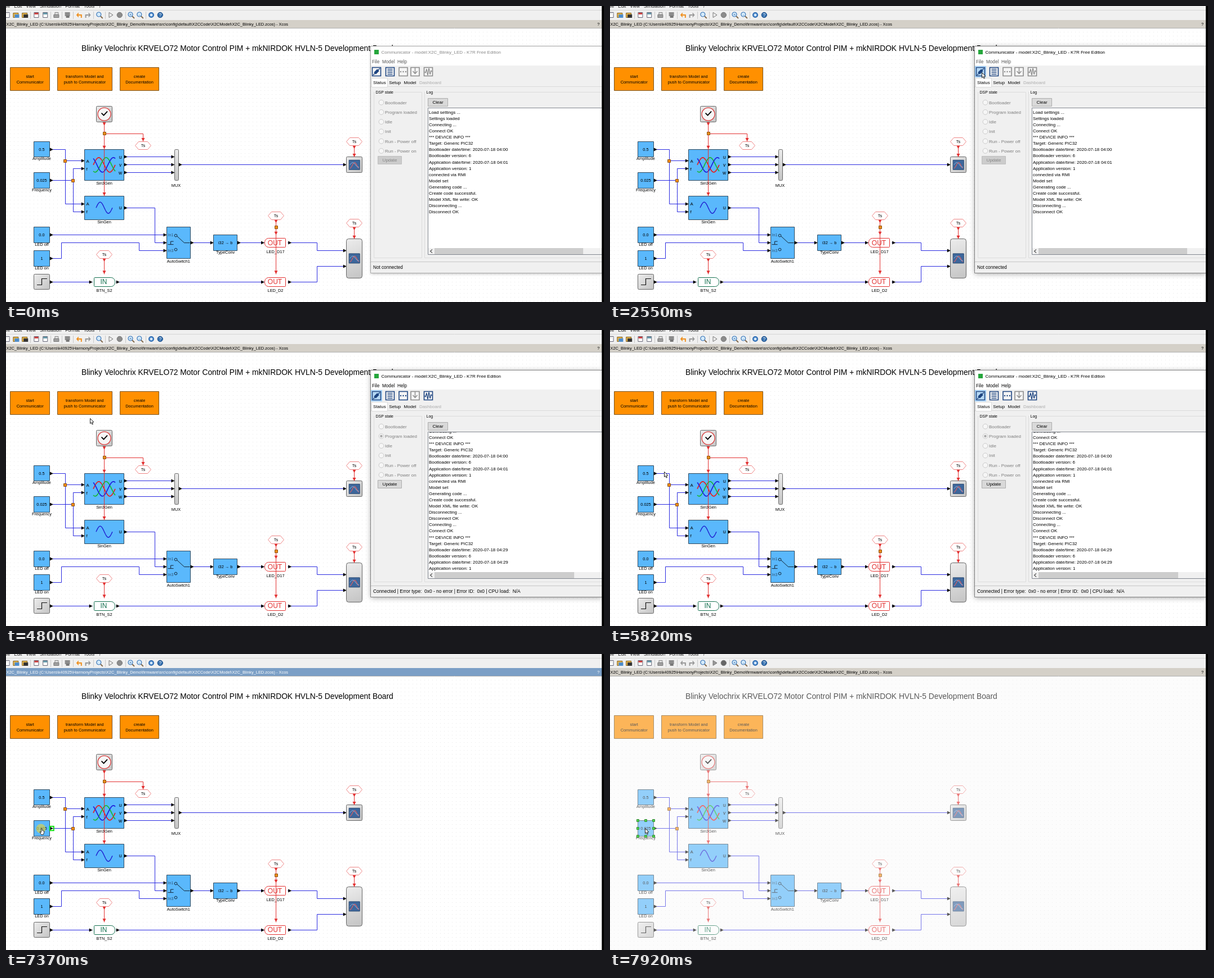
Write an HTML page with a canvas that moves like this. It is 1062 px wide and 527 px high and loops after 7.99 s.

```html
<!DOCTYPE html>
<html lang="en">
<head>
<meta charset="utf-8">
<title>Block diagram and communicator</title>
<style>
html, body { margin: 0; width: 100%; height: 100%; overflow: hidden; background: #fff; }
canvas { display: block; }
</style>
</head>
<body>
<canvas id="stage" width="1062" height="527"></canvas>
<script>
const W = 1062, H = 527, LOOP = 7990, EDGE = 1058;
const ACTIVATE = 2550, CONNECT = 3100, LOADED = 3250, RAISE = 7370, SELECT = 7520, DIM = 7840;
const FONT = '"Liberation Sans", Arial, sans-serif';
const BLUE = '#5ab8fc', WIRE = '#2b2be0', RED = '#e23030', NAVY = '#1d4480', GREY = '#8c8c8c';
const stage = document.getElementById('stage').getContext('2d');
let c = stage;

// ---- drawing helpers ----
const snap = v => Math.floor(v) + 0.5;

function text(s, x, y, size = 7.4, color = '#000', align = 'center') {
  c.font = `${size}px ${FONT}`;
  c.textAlign = align;
  c.fillStyle = color;
  c.fillText(s, x, y + size * 0.36);
}
const left = (s, x, y, size = 8, color = '#000') => text(s, x, y, size, color, 'left');

function row(words, x, y, gap, size, color) {
  for (const word of words) {
    left(word, x, y, size, color(word));
    x += c.measureText(word).width + gap;
  }
}
function paint(fill, stroke, line = 1) {
  if (fill) { c.fillStyle = fill; c.fill(); }
  if (stroke) { c.strokeStyle = stroke; c.lineWidth = line; c.stroke(); }
}
function fillRect(x, y, w, h, fill) {
  c.fillStyle = fill;
  c.fillRect(x, y, w, h);
}
function box(x, y, w, h, fill, stroke, radii = 0) {
  const l = snap(x), t = snap(y);
  c.beginPath();
  c.roundRect(l, t, snap(x + w) - l, snap(y + h) - t, radii);
  paint(fill, stroke);
}
function disc(x, y, r, fill, stroke, line) {
  c.beginPath();
  c.arc(x, y, r, 0, 2 * Math.PI);
  paint(fill, stroke, line);
}
function trace(pts) {
  c.beginPath();
  for (let i = 0; i < pts.length; i += 2) c.lineTo(pts[i], pts[i + 1]);
}
function line(color, width, ...pts) { trace(pts); paint(null, color, width); }
function shape(fill, stroke, ...pts) { trace(pts); c.closePath(); paint(fill, stroke); }
function hLine(y, color, x = 0, end = W) { line(color, 1, x, snap(y), end, snap(y)); }
function at(x, y, draw) {
  c.save();
  c.translate(x, y);
  draw();
  c.restore();
}
function curve(x, y, w, color, width, f) {
  c.beginPath();
  for (let u = 0; u <= 1; u += 1 / 32) c.lineTo(x + w * u, y + f(u));
  paint(null, color, width);
}

// ---- block diagram, laid out on the editor grid ----
const U = 6.94;
const X = n => 49.6 + n * U, Y = n => 241.2 + n * U;

const right = (x, y) => at(x, snap(y), () => shape('#000', null, 0, -3, 6, 0, 0, 3));
const down = (x, y) => at(snap(x), y, () => shape(RED, null, -3, 0, 3, 0, 0, 6));
const joint = (gx, gy) => box(X(gx) - 2.5, Y(gy) - 2.5, 5, 5, '#f28c18', '#8a5210');
const signal = (color, ...cells) => line(color, 1, ...cells.map((n, i) => snap(i % 2 ? Y(n) : X(n))));

function wire(x0, y0, x1, y1 = y0, bend = x1) {
  signal(WIRE, x0, y0, bend, y0, bend, y1, x1, y1);
  right(X(x1) - 6, Y(y1));
}
function output(gx, gy) { right(X(gx) + 0.5, Y(gy)); }

function block(gx, gy, gw, gh, label, value = '') {
  box(X(gx), Y(gy), gw * U, gh * U, BLUE, '#30495c');
  text(value, X(gx + gw / 2), Y(gy + gh / 2));
  text(label, X(gx + gw / 2), Y(gy + gh) + gh * 0.65);
}
function greyBox(gx, gy, gw = 4, gh = 4) {
  const x = X(gx), y = Y(gy);
  const g = c.createLinearGradient(x, y, x + gw * U, y + gh * U);
  g.addColorStop(0, '#ececec');
  g.addColorStop(1, '#c4c4c4');
  box(x, y, gw * U, gh * U, g, '#666', gh > 8 ? 4 : 2);
}
function scope(gx, gy, gh) {
  greyBox(gx, gy, 4, gh);
  at(X(gx + 2), Y(gy + gh / 2), () => {
    box(-10, -9, 19, 17, '#3d679c', '#294870');
    curve(-8, 1, 16, '#e86060', 1.1, u => 5 * Math.cos(6 * u));
    curve(-8, 0, 16, '#9cc4ec', 1, u => -4 * Math.sin(5 * u));
  });
}
function terminal(gx, gy, name, label, color, radii) {
  const x = X(gx), y = Y(gy);
  box(x - 18.5, y - 8, 37, 16, '#fff', color, radii);
  text(name, x - 1, y, 12, color);
  text(label, x, y + 15.5);
}
function event(gx, gy, end) {
  const x = snap(X(gx)), y = snap(Y(gy));
  if (end) {
    signal(RED, gx, gy, gx, end);
    down(x, y + 7);
    down(x, Y(end) - 6);
  }
  shape('#fff', '#ee8585', x - 14, y, x - 8, y - 7, x + 8, y - 7, x + 14, y, x + 8, y + 7, x - 8, y + 7);
  text('Ts', x, y);
}
function orangeButton(gx, gw, ...lines) {
  box(X(gx), Y(-19), gw * U, 6 * U, '#ff9000', '#7a5420');
  lines.forEach((s, i) => text(s, X(gx + gw / 2), 125.5 + i * 9.6));
}
function drawClock() {
  greyBox(16, -9);
  at(X(18), Y(-7), () => {
    disc(0, 0, 11.5, '#f6f6f6', '#d83838', 1.3);
    line('#000', 1.8, -5, -2, -1, 2, 5.5, -5);
  });
}
function drawSwitch() {
  at(X(34), Y(26), () => {
    left('In1', 2, -14, 7, '#315777');
    left('In3', 2, 14, 7, '#315777');
    line('#123', 1, 2, 3, 7, 3, 7, -2.5, 12, -2.5);
    line('#123', 1, 7, 3, 12, 3);
    for (const y of [-13, 12]) disc(16, y, 2.3, BLUE, '#123');
    line('#123', 1, 18, -12, 31, 0, 41, 0);
  });
}

function drawDiagram() {
  fillRect(0, 39, W, H, '#fff');
  for (let y = Y(-29); y < H; y += U) for (let x = X(-7); x < W; x += U) fillRect(Math.floor(x), Math.floor(y), 1, 1, '#e6e6e6');

  left('Blinky Velochrix KRVELO72 Motor Control PIM + mkNIRDOK HVLN-5 Development Board', 134, 75, 13.8);
  orangeButton(-6, 10, 'start', 'Communicator');
  orangeButton(6, 14, 'transform Model and', 'push to Communicator');
  orangeButton(22, 10, 'create', 'Documentation');

  wire(4, 2, 13, 16, 8);
  wire(8, 5, 13);
  wire(4, 10, 13, 18, 10);
  wire(10, 10, 13, 7, 10);
  for (const y of [4, 6, 8]) { wire(23, y, 36); output(23, y); }
  wire(37, 6, 80);
  wire(23, 17, 34, 26, 31);
  wire(4, 24, 34);
  signal(WIRE, 4, 30, 7, 30, 7, 26, 27, 26);
  wire(27, 26, 34, 28, 27);
  wire(40, 26, 46);
  wire(52, 26, 59);
  wire(65, 26, 80, 28, 72.5);
  wire(65, 36, 80, 32, 72.5);
  wire(4, 36, 15);
  wire(21, 36, 59);

  drawClock();
  block(0, 0, 4, 4, 'Amplitude', '0.5');
  block(0, 8, 4, 4, 'Frequency', '0.025');
  block(0, 22, 4, 4, 'LED off', '0.0');
  block(0, 28, 4, 4, 'LED on', '1');
  block(13, 2, 10, 8, 'Sin3Gen');
  block(13, 14, 10, 6, 'SinGen');
  block(34, 22, 6, 8, 'AutoSwitch1');
  block(46, 24, 6, 4, 'TypeConv', 'i32 → b');
  for (const y of [2, 10, 24, 30, 36]) output(4, y);
  for (const [x, y] of [[23, 17], [40, 26], [52, 26], [65, 26], [65, 36], [21, 36], [37, 6]]) output(x, y);

  ['#e82020', '#18b838', '#2020dc'].forEach((color, i) =>
    curve(155, Y(6), 39, color, 1.7, u => -13 * Math.sin(2 * Math.PI * (u - i / 3))));
  curve(160, Y(17), 29, '#2020d0', 1.4, u => -10 * Math.sin(2 * Math.PI * u));
  for (const top of [5, 16]) ['A', 'f'].forEach((s, i) => left(s, 142.5, Y(top + 2 * i), 7.8));
  ['u', 'v', 'w'].forEach((s, i) => text(s, 203, Y(4 + 2 * i), 8.4));
  text('u', 203, Y(17), 8.4);
  drawSwitch();

  greyBox(36, 2, 1, 8);
  text('MUX', 302, 319);
  scope(80, 4, 4);
  scope(80, 25, 10);
  greyBox(0, 34);
  line('#111', 1.2, 55, 496.5, 63.5, 496.5, 63.5, 485.5, 73, 485.5);

  terminal(18, 36, 'IN', 'BTN_S2', '#14704f', [1, 7, 7, 1]);
  terminal(61.8, 26, 'OUT', 'LED_D17', RED, [7, 1, 1, 7]);
  terminal(61.8, 36, 'OUT', 'LED_D2', RED, [7, 1, 1, 7]);

  signal(RED, 18, -5, 18, 14);
  signal(RED, 18, -2, 28, -2, 28, 0);
  for (const [x, y] of [[18, -4.9], [18, 1.1], [18, 13.1], [28, -0.9]]) down(X(x), Y(y));
  event(28, 1);
  event(82, 0, 4);
  event(82, 21, 25);
  event(18, 29, 34);
  event(62, 19, 34);
  down(X(62), Y(24) - 6);
  joint(18, -2);
  joint(8, 5);
  joint(10, 10);
  joint(62, 22);
}

// ---- main window toolbar and title ----
const page = accent => () => {
  box(-4, -5, 8, 9, '#fff', '#667');
  fillRect(-3, -4, 7, 3, accent);
};
const folder = front => () => {
  box(-5, -4, 9, 8, '#e5b54e', '#806020');
  fillRect(-2, -1, 8, 6, front);
};
const printer = () => {
  box(-3, -5, 6, 5, '#ddd', '#888');
  box(-5, -1, 9, 5, '#a0a0a0', '#777');
};
const bin = () => { fillRect(-5, -5, 9, 7, GREY); fillRect(-3, 1, 6, 4, '#777'); };
const turn = (dir, color) => () => {
  line(color, 2, 4 * dir, 5, 4 * dir, 0, -dir, 0);
  shape(color, null, -5 * dir, 0, -dir, -4.5, -dir, 4.5);
};
const lens = sign => () => {
  line('#80684a', 1.8, 2, 2, 6, 6);
  disc(-1, -1, 4, '#d4eafa', '#3a76b8', 1.2);
  text(sign, -1, -1, 7, '#225ca0');
};
const play = color => () => shape(color, '#777', -3, -4.5, -3, 4.5, 4, 0);
const dot = (fill, ring) => () => disc(0, 0, 4.7, fill, ring);
const gear = () => { disc(0, 0, 4, '#8cb8e4', '#2d6cb4', 2); disc(0, 0, 1.5, '#fff'); };
const help = () => { dot('#336fae', '#204f88')(); text('?', 0, 0, 8.5, '#fff'); };

function drawChrome(active, dimmed) {
  fillRect(0, 0, W, 25, '#f0f0f0');
  row(['File', 'Edit', 'View', 'Simulation', 'Format', 'Tools', '?'], -6, 0, 7, 8.2, () => '#222');
  hLine(7, '#d6d6d6');
  const groups = [
    [page('#eee'), folder('#4c8ccc'), folder('#333')],
    [page('#c44'), page('#69a')],
    [printer],
    [bin],
    [turn(1, dimmed ? '#999' : '#ef9020'), turn(-1, '#999')],
    [lens('')],
    [play(dimmed ? '#999' : '#eee'), dot(dimmed ? '#666' : GREY, '#777')],
    [lens('+'), lens('-')],
    [gear, help]
  ];
  let x = 1.6;
  for (const icons of groups) {
    for (const icon of icons) { at(x, 16, icon); x += 15.8; }
    if (icons !== groups.at(-1)) fillRect(Math.round(x - 6), 10, 1, 13, '#c8c8c8');
    x += 4.4;
  }
  fillRect(0, 25, W, 14, active ? '#7b9fc6' : '#d4d0c8');
  hLine(39, '#b0b0b0');
  const ink = active ? '#fff' : '#000';
  text('X2C_Blinky_LED (C:\\Users\\k40925\\HarmonyProjects\\X2C_Blinky_Demo\\firmware\\src\\config\\default\\X2CCode\\X2CModel\\X2C_Blinky_LED.zcos) - Xcos', 501, 32.5, 7.42, ink, 'right');
  text('?', 1052, 32.5, 7.4, ink);
}

// ---- communicator window ----
const device = (boot, app) => ['Connecting ...', 'Connect OK', '*** DEVICE INFO ***', 'Target: Generic PIC32',
  `Bootloader date/time: 2020-07-18 ${boot}`, 'Bootloader version: 6',
  `Application date/time: 2020-07-18 ${app}`, 'Application version: 1'];
const FIRST_LOG = ['Load settings ...', 'Settings loaded', ...device('04:00', '04:01'), 'connected via RMI', 'Model set',
  'Generating code ...', 'Create code successful.', 'Model XML file write: OK', 'Disconnecting ...', 'Disconnect OK'];
const FULL_LOG = [...FIRST_LOG, ...device('04:29', '04:29')];
const STATES = ['Bootloader', 'Program loaded', 'Idle', 'Init', 'Run - Power off', 'Run - Power on'];

function group(label, x, w) {
  box(x, 153, w, 295, null, '#dcdcdc');
  c.font = `7px ${FONT}`;
  fillRect(x + 2, 150, c.measureText(label).width + 3, 8, '#f0f0f0');
  left(label, x + 3.5, 153.5, 7);
}
function button(label, x, y, w, enabled) {
  box(x, y, w, 14, enabled ? '#d9d9d9' : '#cccccc', enabled ? '#adadad' : '#bfbfbf');
  text(label, x + w / 2 + 0.5, y + 7.5, 8, enabled ? '#000' : '#838383');
}
function tool(x, color, draw, fill = '#f5f5f5') {
  at(x, 117, () => {
    c.beginPath();
    c.rect(-7.5, -7.5, 15, 15);
    paint(fill, color, 1.6);
    draw();
  });
}
function drawTools(hover, online) {
  const live = online ? NAVY : GREY;
  if (hover) box(648, 107, 19, 19, '#cce8ff', '#99d1ff');
  tool(658, NAVY, () => {
    line(NAVY, 1.5, -6, 6, 6, -6);
    line(NAVY, 5, -3, 3, 3, -3);
  }, hover ? '#b5d8f4' : '#f5f5f5');
  tool(682, NAVY, () => { for (let y = -4.5; y < 6; y += 3) line(NAVY, 1.3, -4.5, y, 4.5, y); });
  tool(705.5, live, () => { for (let x = -4.5; x < 6; x += 4.5) disc(x, 0, 1.2, live); });
  tool(726.5, GREY, () => {
    line(GREY, 1.4, 0, -8, 0, 3);
    line(GREY, 1.4, -4, -1, 0, 3.5, 4, -1);
  });
  tool(750, live, () => curve(-6.5, 0, 13, live, 1.3, u => 6 * Math.sin(u * Math.PI) * Math.sin(u * 6 * Math.PI)));
}
function drawFrame(active) {
  c.save();
  c.shadowColor = `rgba(0,0,0,${active ? 0.35 : 0.25})`;
  c.shadowBlur = active ? 9 : 5;
  c.shadowOffsetY = 2;
  fillRect(648, 71, 411, 404, '#f0f0f0');
  c.restore();
  fillRect(648, 71, 411, 35, '#fff');
  box(647, 71, 415, 404, null, active ? '#808080' : '#a8a8a8');
  fillRect(654, 78, 8, 8, '#25a63c');
  left('Communicator - model:X2C_Blinky_LED - K7R Free Edition', 666.5, 82, 8, active ? '#000' : '#888');
}
function drawLog(online) {
  box(749, 181, 320, 261, '#fff', '#828790');
  c.save();
  c.beginPath();
  c.rect(750, 182, 309, 248);
  c.clip();
  const scroll = online ? 31 : 0;
  (online ? FULL_LOG : FIRST_LOG).forEach((s, i) => left(s, 751, 189 + i * 11.09 - scroll, 7.95));
  c.restore();
  fillRect(750, 431, 309, 11, '#f0f0f0');
  line('#555', 1.2, 757, 433.5, 753.5, 436.5, 757, 439.5);
  fillRect(761, 431, online ? 248 : 264, 11, '#cdcdcd');
}
function drawCommunicator(t) {
  const online = t >= CONNECT;
  drawFrame(t >= ACTIVATE);
  row(['File', 'Model', 'Help'], 650, 99, 4.8, 8.2, () => t >= 2700 ? '#000' : '#555');
  drawTools(t >= 1850, t >= 2870);
  hLine(143, '#dadada', 648);
  box(649, 128, 28, 16, '#fff', '#dadada');
  row(['Status', 'Setup', 'Model', 'Dashboard'], 652, 135.8, 5.5, 8, s => s === 'Dashboard' ? '#ababab' : '#000');

  group('DSP state', 653, 85);
  group('Log', 743, 330);
  STATES.forEach((s, i) => {
    const y = 171.7 + i * 17.25;
    disc(666.5, y, 4.4, '#f6f6f6', '#cacaca');
    if (t >= LOADED && s === 'Program loaded') disc(666.5, y, 2.3, '#aaa');
    left(s, 673, y, 8, '#7d7d7d');
  });
  button('Update', 660, 267, 42, online);
  button('Clear', 749, 164, 35, true);
  drawLog(online);
  hLine(455, '#c6c6c6', 648);
  left(online ? 'Connected | Error type:  0x0 - no error | Error ID:  0x0 | CPU load:  N/A' : 'Not connected', 652, 465, online ? 8.4 : 8.2);
}

// ---- pointer: each move eases along a quadratic curve in discrete steps ----
const MOVES = [
  { start: 1160, end: 1850, steps: 10, from: [1017, 518], via: [687, 202], to: [659, 122] },
  { start: 2000, end: 2001, steps: 2, from: [660, 118], via: [660, 118], to: [660, 118] },
  { start: 4110, end: 4880, steps: 11, from: [645, 124], via: [165, 200], to: [148, 155] },
  { start: 4950, end: 5730, steps: 11, from: [147, 152], via: [60, 210], to: [95, 251] },
  { start: 5820, end: 6600, steps: 11, from: [96, 252], via: [86, 272], to: [62, 308] },
  { start: 6750, end: 7140, steps: 6, from: [60, 309], via: [60, 310], to: [62, 310] }
];
function pointerAt(t) {
  const m = MOVES.findLast(move => move.start <= t);
  if (!m) return null;
  const last = m.steps - 1;
  const step = Math.floor((t - m.start) / (m.end - m.start) * last + 0.1);
  const u = Math.min(1, step / last);
  const k = u * u * (3 - 2 * u);
  return [0, 1].map(i => (1 - k) ** 2 * m.from[i] + 2 * k * (1 - k) * m.via[i] + k * k * m.to[i]);
}
function drawPointer(t) {
  const p = pointerAt(t);
  if (!p) return;
  const hand = t >= 7140 && t < DIM;
  at(snap(p[0]), snap(p[1]), () => hand
    ? shape('#fff', '#333', 0, 0, 1.5, 0, 2, 4, 5.5, 5, 4, 11, 0, 11, -2.5, 6, 0, 7)
    : shape('#fff', '#222', 0, 0, 0, 9, 2, 7.3, 3.6, 10.7, 5, 10, 3.5, 6.8, 6.4, 6.5));
}
function drawHandles() {
  for (let i = 0; i < 9; i++) {
    if (i !== 4) box(X(2 * (i % 3)) - 2, Y(8 + 2 * Math.floor(i / 3)) - 2, 4, 4, '#4cd84c', '#3a8a3a');
  }
}

const diagram = document.createElement('canvas');
diagram.width = W;
diagram.height = H;
c = diagram.getContext('2d');
drawDiagram();
c = stage;

function frame() {
  const t = performance.now() % LOOP;
  const dimmed = t >= DIM, raised = t >= RAISE && !dimmed;
  const clicking = raised && (t < SELECT || t >= 7690);
  c.drawImage(diagram, 0, 0);
  if (dimmed) fillRect(0, 40, W, H, 'rgba(245,245,245,.36)');
  drawChrome(raised, dimmed);
  if (t < RAISE) drawCommunicator(t);
  if (raised) {
    c.strokeStyle = '#00e000';
    c.lineWidth = 1.8;
    c.strokeRect(77.8, 306.8, 7, 7.5);
  }
  if (t >= SELECT) drawHandles();
  if (clicking) disc(62, 311, 8.5, 'rgba(214,208,84,.7)');
  drawPointer(t);
  fillRect(EDGE, 0, W - EDGE, H, '#000');
  requestAnimationFrame(frame);
}
requestAnimationFrame(frame);
</script>
</body>
</html>
```
